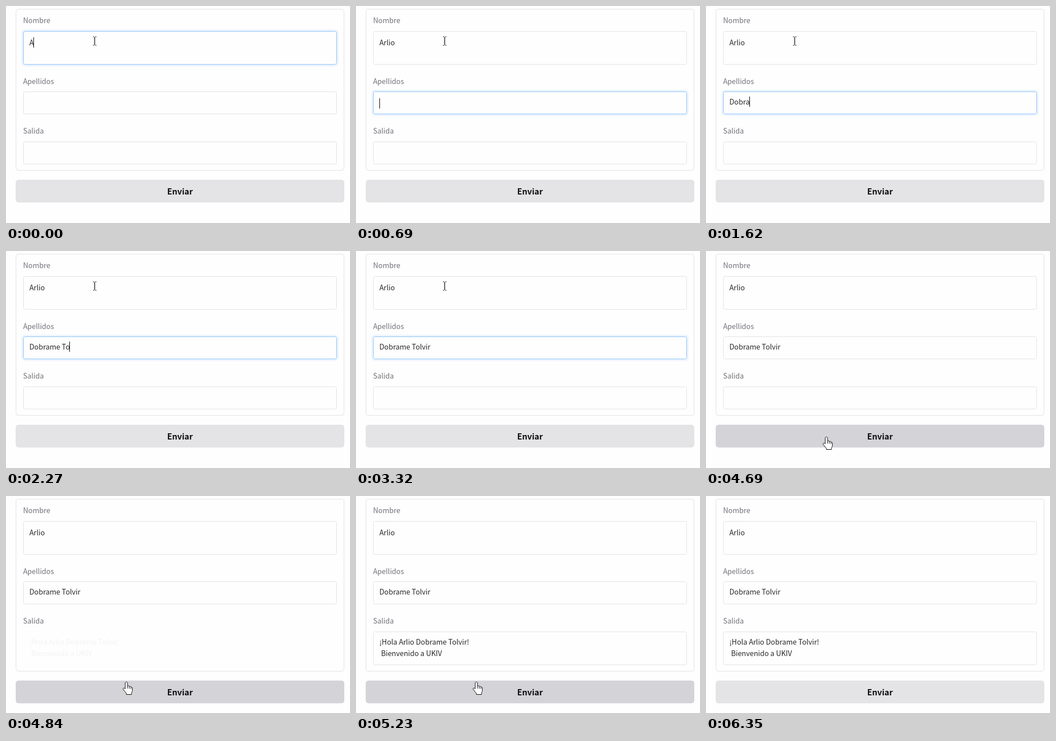
An HTML page for the animation above (6760 ms loop, 603x381 px).

```html
<!DOCTYPE html>
<html lang="es">
<head>
<meta charset="utf-8">
<style>
  html, body { margin: 0; width: 100%; height: 100%; overflow: hidden; background: #fefefe; }
  svg { display: block; width: 603px; height: 381px; }
  text {
    font: 12.53px "Noto Sans CJK JP", "Noto Sans CJK SC", "Noto Sans CJK", "Open Sans", sans-serif;
    fill: #27272a;
    white-space: pre;
  }
  .label { fill: #71717a; }
  .send { font-size: 14.2px; font-weight: bold; fill: #0b0b0c; text-anchor: middle; }
  .box { fill: #fefefe; stroke: #e4e4e7; }
  .glow { fill: none; stroke: #ecf4fe; stroke-width: 3; }
  .pointer { fill: #fff; stroke: #111; stroke-linejoin: round; }
</style>
</head>
<body>
<svg viewBox="0 0 603 381">
  <rect id="panel" class="box" x="17.5" y="5.5" width="575" rx="3.5"/>
  <text class="label" x="30" y="30">Nombre</text>
  <text class="label" x="30" y="137">Apellidos</text>
  <text class="label" x="30" y="224">Salida</text>

  <rect id="glow" class="glow" x="28.5" width="553" rx="5"/>
  <rect id="first" class="box" x="30.5" y="44.5" width="549" height="58" rx="3"/>
  <rect id="last" class="box" x="30.5" y="150.5" width="549" height="39" rx="3"/>
  <rect id="out" class="box" x="30.5" y="238.5" width="549" rx="3"/>
  <text id="firstText" x="41" y="69"></text>
  <text id="lastText" x="41" y="173"></text>
  <g id="reply">
    <text x="41" y="261">¡Hola Arlio Dobrame Tolvir!</text>
    <text x="44" y="281">Bienvenido a UKIV</text>
  </g>
  <rect id="caret" width="1" height="18" fill="#111"/>

  <g id="button">
    <rect id="face" x="17" y="305" width="576" height="40" rx="5"/>
    <text class="send" x="305" y="331">Enviar</text>
  </g>

  <g id="beam" fill="none" stroke="#111">
    <path d="M-3 -7.5H-1M1 -7.5H3M-3 7.5H-1M1 7.5H3M0 -7V7" stroke-width="1.2"/>
  </g>
  <path id="arrow" class="pointer" d="M.5 .5V16L4 12.6L6.6 18.3L9 17.2L6.5 11.7H11.3Z"/>
  <g id="hand">
    <path class="pointer" d="M4.5 12.5V2.4C4.5 -.1 8.5 -.1 8.5 2.4V8C9.2 6.6 11.5 7 11.7 8.6C12.5 7.6 14.4 8 14.6 9.7C15.6 8.9 17 9.6 17 11.2V15.5C17 18 15.5 18.5 15.5 20.5V22.5H6.5V20.5C4.8 18.6 2.8 16 1 13.6C-.1 11.8 1.7 10.4 3.1 11.5Z"/>
    <path d="M8.5 8V12M11.7 9V12.3M14.6 10V12.8" stroke="#111" fill="none"/>
  </g>
</svg>
<script>
const LOOP = 6760;
const FIRST = 'Arlio', LAST = 'Dobrame Tolvir';
const BLUR_FIRST = 690, BLUR_LAST = 4690, REPLY = 4840;

// [start time, characters typed]
const firstKeys = [[0, 1], [280, 3], [430, 5]];
const lastKeys = [[0, 0], [970, 1], [1090, 2], [1340, 3], [1620, 5], [1770, 6], [1890, 8],
  [2140, 9], [2270, 10], [2410, 11], [2530, 12], [2680, 13], [2810, 14]];

// [start time, shape, x, y]
const pointer = [
  [0, 'beam', 155.5, 61.5], [3600, 'arrow', 201, 213], [3750, 'beam', 207.5, 258.5],
  [3870, 'arrow', 208, 283], [4020, 'arrow', 210, 293], [4140, 'arrow', 212, 302],
  [4290, 'hand', 204.5, 327], [4410, 'hand', 204.5, 326], [6080, 'hand', 404.5, 358],
  [6230, 'arrow', 486, 372], [6350, 'none', 0, 0]
];
const fade = [[0, 0], [REPLY, 0.05], [4960, 0.55], [5080, 1]];
const blink = [[0, 1], [3320, 0], [3870, 1], [4410, 0]];

const $ = id => document.getElementById(id);
const set = (id, attrs) => {
  for (const key in attrs) $(id).setAttribute(key, attrs[key]);
};
const at = (steps, t) => steps.filter(s => s[0] <= t).pop();

function render(t) {
  const focus = t < BLUR_FIRST ? 'first' : t < BLUR_LAST ? 'last' : '';
  const replied = t >= REPLY;
  const grow = replied ? 19 : 0;
  const opacity = at(fade, t)[1];

  $('firstText').textContent = FIRST.slice(0, at(firstKeys, t)[1]);
  $('lastText').textContent = LAST.slice(0, at(lastKeys, t)[1]);

  for (const id of ['first', 'last']) {
    $(id).style.stroke = id === focus ? '#93c5fd' : '';
  }
  set('glow', {
    y: focus === 'first' ? 42.5 : 148.5,
    height: focus === 'first' ? 62 : 43,
    opacity: focus ? 1 : 0
  });

  if (focus) {
    const text = $(focus + 'Text');
    const width = text.textContent ? text.getComputedTextLength() : 0;
    const y = focus === 'first' ? 55 : width ? 159 : 162;
    set('caret', { x: Math.floor(41 + width), y });
  }
  set('caret', { opacity: focus ? at(blink, t)[1] : 0 });

  set('panel', { height: 283 + grow });
  set('out', { height: 39 + grow, opacity: replied ? opacity : 1 });
  set('reply', { opacity });
  set('button', { transform: `translate(0 ${grow})` });
  set('face', { fill: t >= 4290 && t < 6230 ? '#d4d4d8' : '#e4e4e7' });

  const [, shape, x, y] = at(pointer, t);
  for (const id of ['beam', 'arrow', 'hand']) {
    set(id, { transform: `translate(${x} ${y})`, visibility: id === shape ? 'visible' : 'hidden' });
  }
}

const start = performance.now();
function tick() {
  render((performance.now() - start) % LOOP);
  requestAnimationFrame(tick);
}
tick();
</script>
</body>
</html>
```
